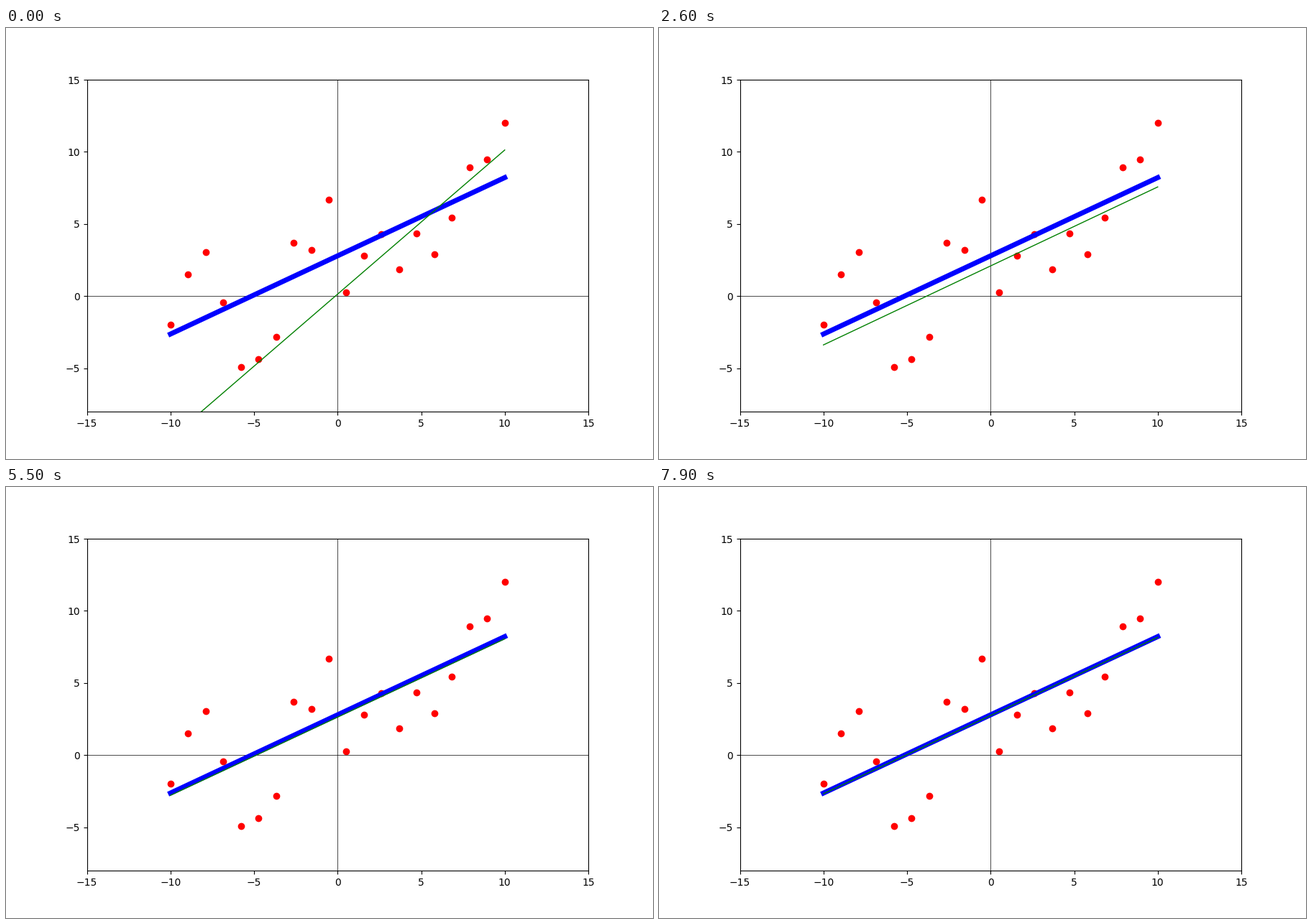
These frames come from a looping animation (900 by 600 pixels, 8000 ms). A matplotlib script:

```python
import numpy as np
import matplotlib.pyplot as plt
from matplotlib.animation import FuncAnimation

FRAMES, INTERVAL = 80, 100
RATE = 0.025

x = np.linspace(-10, 10, 20)
y = np.array([-1.98, 1.49, 3.03, -0.43, -4.92, -4.39, -2.83, 3.70, 3.20, 6.71,
              0.26, 2.80, 4.30, 1.86, 4.35, 2.90, 5.44, 8.93, 9.47, 12.01])
slope, intercept = np.polyfit(x, y, 1)

fig, ax = plt.subplots(figsize=(9, 6), dpi=100)
ax.set_xlim(-15, 15)
ax.set_ylim(-8, 15)
ax.axhline(0, color="black", lw=0.5)
ax.axvline(0, color="black", lw=0.5)
ax.scatter(x, y, color="red")
ax.plot(x, slope * x + intercept, color="blue", lw=5)
fit, = ax.plot([], [], color="green", lw=1)


def descend(steps):
    """Line after gradient descent on the mean squared error from (0, 0)."""
    a = slope * (1 - (1 - 2 * RATE * np.mean(x**2)) ** steps)
    b = intercept * (1 - (1 - 2 * RATE) ** steps)
    return a, b


def update(i):
    a, b = descend(i + 1)
    fit.set_data(x, a * x + b)
    return fit,


anim = FuncAnimation(fig, update, frames=FRAMES, interval=INTERVAL,
                     repeat=True, repeat_delay=0)
plt.show()
```
